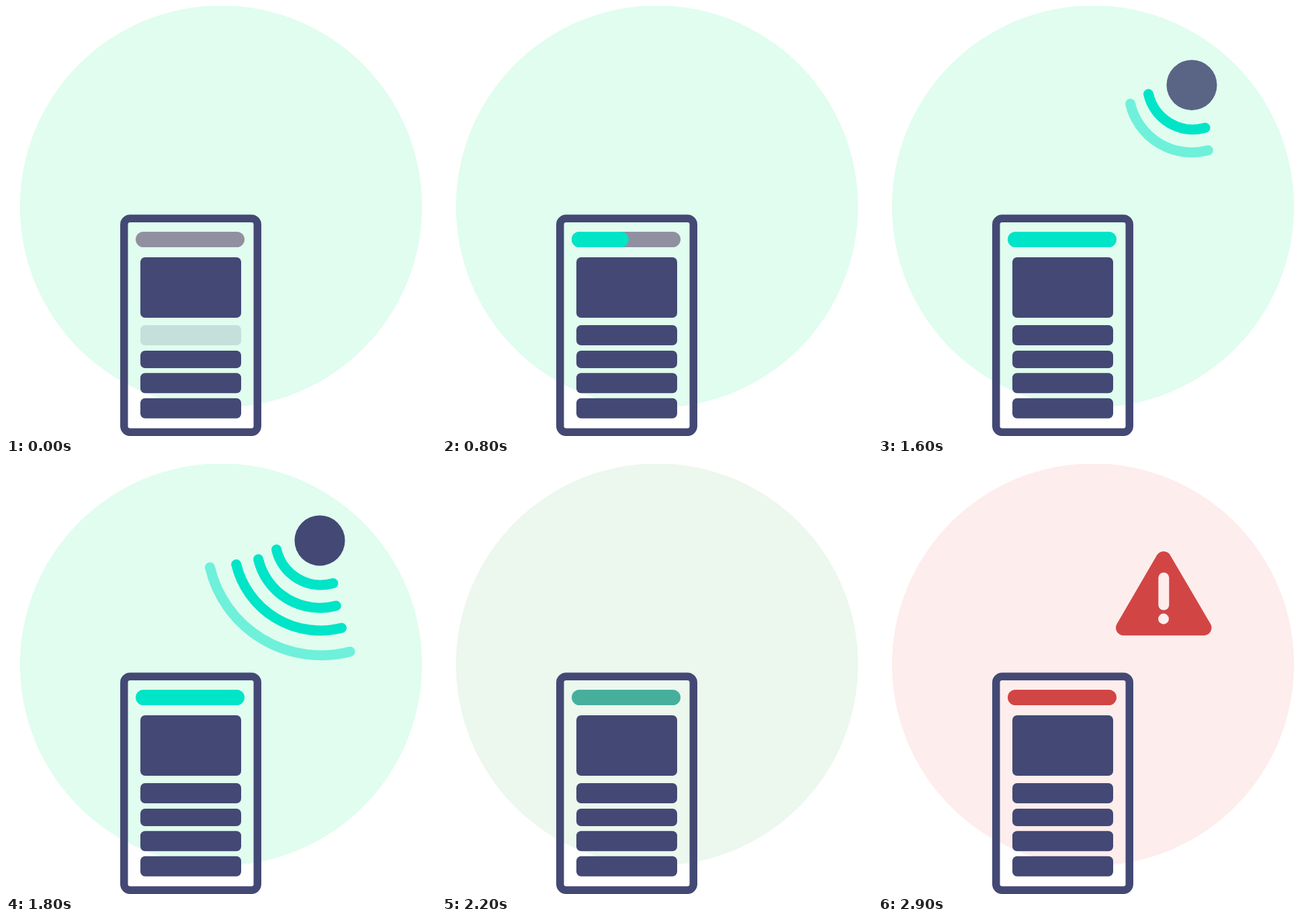
These frames come from a looping animation (640 px wide and 640 px high, 3600 ms). An HTML page:

```html
<!DOCTYPE html>
<html lang="en">
<head>
<meta charset="utf-8">
<title>Upload status</title>
<style>
  html, body { margin: 0; width: 100%; height: 100%; overflow: hidden; background: #fff; }
  svg { display: block; width: 100%; height: 100%; }
  .ink { fill: #434974; }
  .arc { fill: none; stroke: #00e4c7; stroke-width: 15; stroke-linecap: round; }
</style>
</head>
<body>
<svg viewBox="0 0 640 640">
  <circle id="bg" cx="320" cy="298.5" r="299.2"/>

  <g class="ink">
    <rect x="175.75" y="316.25" width="198.5" height="318" rx="9" fill="none" stroke="#434974" stroke-width="11.5"/>
    <rect x="200" y="374" width="150" height="90" rx="7"/>
    <rect id="row" x="200" y="475" width="150" height="30" rx="7"/>
    <rect x="200" y="513" width="150" height="26" rx="7"/>
    <rect x="200" y="546.3" width="150" height="30" rx="7"/>
    <rect x="200" y="583.7" width="150" height="30" rx="7"/>
  </g>
  <rect id="track" x="193" y="336" width="162" height="23" rx="11.5" fill="#9090a0"/>
  <rect id="bar" x="193" y="336" height="23" rx="11.5"/>

  <g id="signal">
    <circle id="dot" class="ink" cx="467" cy="96.7" r="37.5"/>
    <path class="arc" d="M402.5 110A68 68 0 0 0 487 160.3"/>
    <path class="arc" d="M375.5 124.5A94 94 0 0 0 491.3 193.7"/>
    <path class="arc" d="M342.7 132.2A129 129 0 0 0 499.5 226.8"/>
    <path class="arc" d="M303.5 136.5A170 170 0 0 0 512 262"/>
  </g>

  <g id="alert">
    <path d="M425 141.5L485 243.7H365.5Z" fill="#d24545" stroke="#d24545" stroke-width="23" stroke-linejoin="round"/>
    <g id="mark">
      <rect x="417.3" y="161.5" width="16" height="56" rx="8"/>
      <circle cx="425" cy="230.5" r="7.9"/>
    </g>
  </g>
</svg>
<script>
  const LOOP = 3600, STEP = 100;
  const MINT = [224, 253, 239], BLUSH = [253, 237, 236];
  const GREEN = [0, 228, 199], RED = [210, 69, 69];
  // Fade in start, end; fade out start, end
  const DOT = [1200, 1670, 1850, 2170];
  const ARCS = [
    [1300, 1550, 1800, 2080],
    [1500, 1700, 1900, 2100],
    [1600, 1800, 1975, 2185],
    [1700, 1900, 1960, 2200]
  ];

  const $ = id => document.getElementById(id);
  const arcs = document.querySelectorAll('.arc');
  const ramp = (t, a, b) => Math.min(1, Math.max(0, (t - a) / (b - a)));
  const ease = (t, a, b) => { const p = ramp(t, a, b); return p * p * (3 - 2 * p); };
  const pulse = (t, [a, b, c, d]) => ramp(t, a, b) * (1 - ramp(t, c, d));
  const mix = (from, to, p) => `rgb(${from.map((v, i) => Math.round(v + (to[i] - v) * p))})`;
  const shift = (el, y) => el.setAttribute('transform', `translate(0 ${y.toFixed(2)})`);

  function draw(t) {
    const back = mix(MINT, BLUSH, ramp(t, 2000, 2500));
    $('bg').style.fill = back;
    $('mark').style.fill = back;

    $('row').style.opacity = ramp(t, -100, 500);
    const fill = ramp(t, 360, 1200);
    $('bar').setAttribute('width', 162 * fill);
    $('bar').style.fill = mix(GREEN, RED, ramp(t, 2000, 2600));
    $('track').style.opacity = fill < 1 ? 1 : 0;

    shift($('signal'), 42.5 - 24 * ease(t, 1200, 1700) - 24 * ease(t, 1750, 2107));
    $('dot').style.opacity = pulse(t, DOT);
    arcs.forEach((el, i) => { el.style.opacity = pulse(t, ARCS[i]); });

    shift($('alert'), 27.5 * (1 - ease(t, 2430, 2900)));
    $('alert').style.opacity = ramp(t, 2430, 2900);
  }

  const start = performance.now();
  function tick() {
    const t = (performance.now() - start) % LOOP;
    draw(Math.floor(t / STEP) * STEP);
    requestAnimationFrame(tick);
  }
  tick();
</script>
</body>
</html>
```
